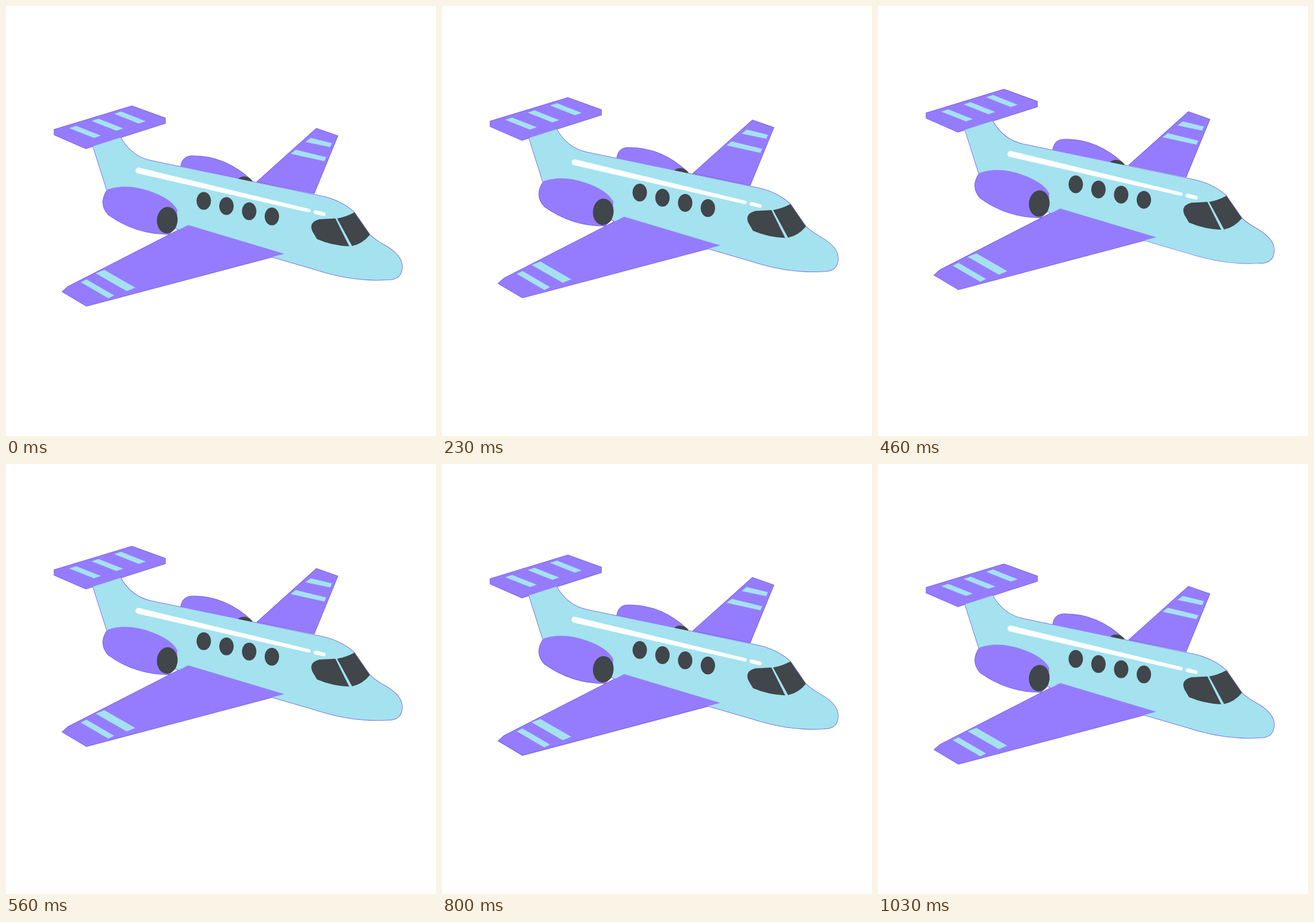
Write an HTML page with a canvas that moves like this. It is 748 by 748 pixels and loops after 1070 ms.

```html
<!DOCTYPE html>
<html lang="en">
<head>
<meta charset="utf-8">
<title>Plane</title>
<style>
  html, body { margin: 0; width: 100%; height: 100%; overflow: hidden; background: #fff; }
  canvas { display: block; width: 748px; height: 748px; }
</style>
</head>
<body>
<canvas id="stage" width="748" height="748"></canvas>
<script>
const ctx = document.getElementById('stage').getContext('2d');
const PURPLE = '#957cff', CYAN = '#a4e2ef', DARK = '#40464a', WHITE = '#fff', FIRE = '#ffb700';
const EDGE = '#694fd9', FIRE_EDGE = '#a97b12';
const LOOP = 1070, STEPS = 32, LAST = STEPS - 1, PEAK = 16, RISE = 33;

const shape = d => new Path2D(d);
const poly = (...pts) => shape('M' + pts.join('L') + 'Z');
const series = (n, make) => Array.from({ length: n }, (_, i) => make(i));

function oval(x, y, rx, ry, tilt = 0) {
  const p = new Path2D();
  p.ellipse(x, y, rx, ry, tilt, 0, Math.PI * 2);
  return p;
}

// Slanted bar: a long side and a short side, the far end cut back by `cut`
function bar(x, y, [lx, ly], [sx, sy], cut = 0) {
  return poly([x, y], [x + sx, y + sy], [x + sx + lx - cut, y + sy + ly], [x + lx, y + ly]);
}

// Round-ended line that changes from radius r1 to r2
function taper(x1, y1, r1, x2, y2, r2) {
  const a = Math.atan2(y2 - y1, x2 - x1), q = Math.PI / 2, p = new Path2D();
  p.arc(x1, y1, r1, a + q, a - q);
  p.arc(x2, y2, r2, a - q, a + q);
  return p;
}

const flames = [
  poly([106, 300.5], [180, 318], [172, 354]),
  poly([237, 247], [312, 266], [305, 283], [271, 274])
];

const farEngine = shape('M304 281Q306 262 322 261Q380 259 428 304V312Z');
const farIntake = oval(415, 306, 13, 9.5, 0.1);
const farWing = poly([437, 305.5], [540, 213], [577, 226], [536, 326]);
const body = shape('M150 240L198 226Q216 261 252 269L428 305.5L545 330Q582 337 606 359' +
  'L633 398Q642 407 660 417Q689 434 689 453Q689 476 665 476Q605 480 540 459L300 389L176 322Z');
const tail = poly([84, 215], [219, 174], [277, 195], [277, 204], [139, 248], [84, 224]);
const nearEngine = shape('M177 319Q210 308 250 322Q288 335 298 355' +
  'L296 385L283 397Q225 397 178 363Q160 343 177 319Z');
const nearIntake = oval(280.5, 372.5, 18, 23, 0.08);
const nearWing = poly([317, 381], [484, 431], [140, 522], [98, 497], [108, 488]);
const outlined = [farEngine, farWing, body, tail, nearEngine, nearWing];

const stripes = [
  ...series(3, i => bar(110 + 39 * i, 212.5 - 12.5 * i, [43, 17], [12, -4])),
  ...series(2, i => bar(156 - 26 * i, 465 + 15.5 * i, [54 - 6 * i, 31 - 3 * i], [15 - 5 * i, -6 + i])),
  ...series(2, i => bar(521 - 26 * i, 236.5 + 20.5 * i, [43 + 16 * i, 9 + 4 * i], [9, -7], 6))
];
const trim = [taper(230.5, 286.3, 5.2, 527, 356, 3), taper(538.5, 358.7, 3.4, 553, 362.2, 3.2)];
const windows = series(4, i => oval(344 + 39.5 * i, 339 + 9 * i, 12.5, 15.5));
const cockpit = [
  shape('M573 369.5L545 371Q526 376 533 392L541 405.5Q568 417 597 418Z'),
  shape('M576 369.5Q591 367 606 359L633 398Q620 414 602 417.5Z')
];

function fill(color, ...paths) {
  ctx.fillStyle = color;
  paths.forEach(p => ctx.fill(p));
}

function outline(color, ...paths) {
  ctx.strokeStyle = color;
  ctx.lineWidth = 1.5;
  paths.forEach(p => ctx.stroke(p));
}

const lift = step => RISE * Math.min(step / PEAK, (LAST - step) / (LAST - PEAK));

function draw(time) {
  const step = Math.min(LAST, Math.floor((time % LOOP + 7) * 0.03));
  ctx.setTransform(1, 0, 0, 1, 0, 0);
  ctx.fillStyle = WHITE;
  ctx.fillRect(0, 0, 748, 748);
  ctx.translate(0, -lift(step));
  if (step >= 25 && step <= 29) {
    outline(FIRE_EDGE, ...flames);
    fill(FIRE, ...flames);
  }
  outline(EDGE, ...outlined);
  fill(PURPLE, farEngine, farWing);
  fill(DARK, farIntake);
  fill(CYAN, body);
  fill(PURPLE, tail, nearEngine);
  fill(DARK, nearIntake);
  fill(PURPLE, nearWing);
  fill(CYAN, ...stripes);
  fill(WHITE, ...trim);
  fill(DARK, ...windows, ...cockpit);
}

const start = performance.now();
function tick() {
  draw(performance.now() - start);
  requestAnimationFrame(tick);
}
tick();
</script>
</body>
</html>
```
